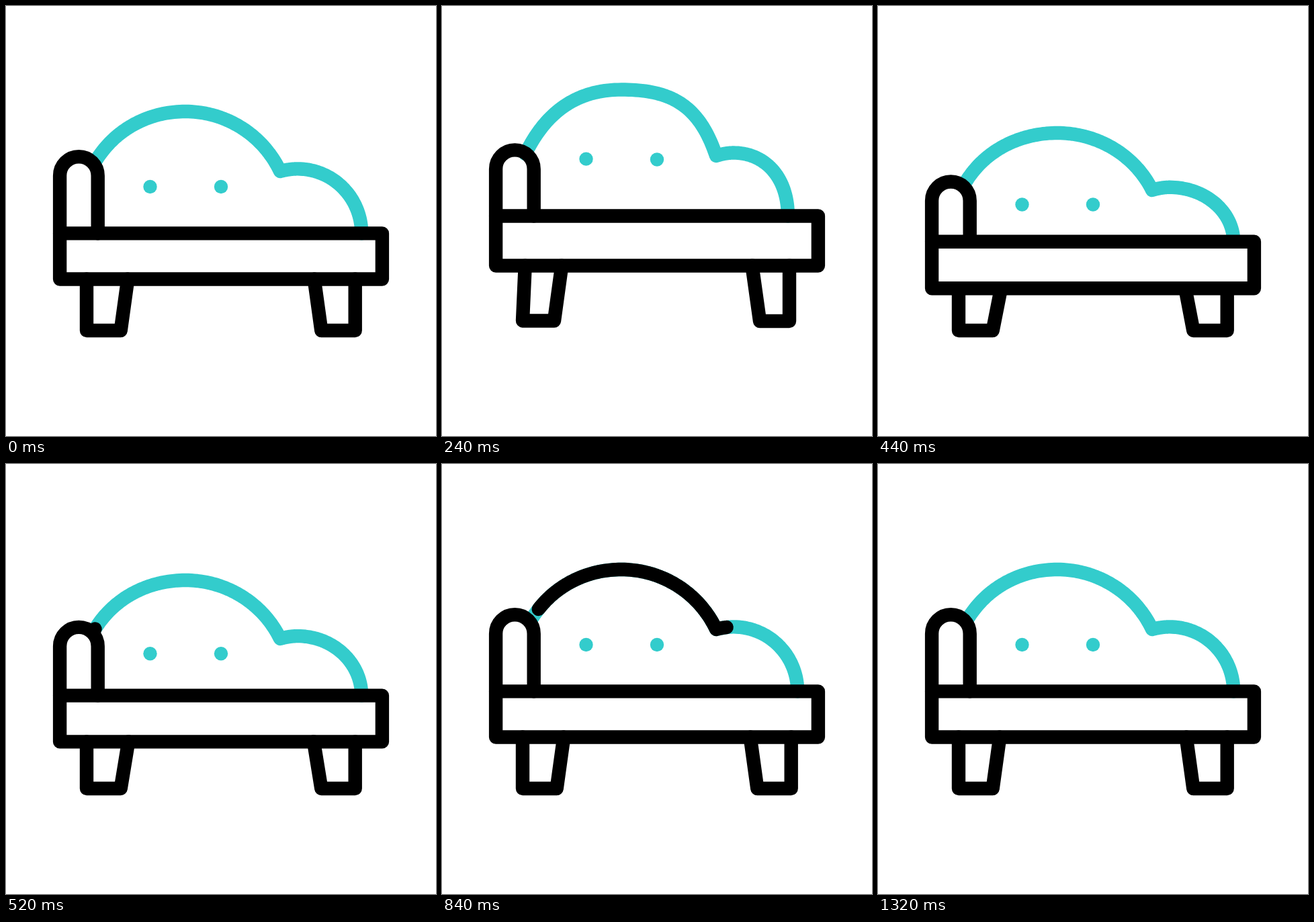
An HTML page with a canvas that plays this animation: 640x640 px, repeating every 1480 ms.

```html
<!DOCTYPE html>
<html lang="en">
<head>
<meta charset="utf-8">
<title>Chaise longue</title>
<style>
  html, body { margin: 0; width: 100%; height: 100%; overflow: hidden; background: #fff; }
  canvas { display: block; }
</style>
</head>
<body>
<canvas id="stage" width="640" height="640"></canvas>
<script>
const ctx = document.getElementById('stage').getContext('2d');
const LOOP = 1480, STEP = 40, BEAT = 160;
const TEAL = '#33cccc', BLACK = '#000';

const progress = (t, from, to) => Math.min(1, Math.max(0, (t - from) / (to - from)));
const smooth = x => x * x * (3 - 2 * x);
const pulse = (t, peak) => smooth(Math.max(0, 1 - Math.abs(t - peak) / BEAT));

// cubic-bezier(.65, 0, .35, 1), solved by bisection
function strongEase(x) {
  if (x <= 0 || x >= 1) return x;
  let lo = 0, hi = 1;
  for (let i = 0; i < 24; i++) {
    const s = (lo + hi) / 2, r = 1 - s;
    if (1.95 * r * r * s + 1.05 * r * s * s + s * s * s < x) lo = s; else hi = s;
  }
  return smooth(lo);
}

// curve from a foot up to a peak that it reaches horizontally; handles are shares of the span
function shoulder(foot, peak, lean, rise, reach) {
  const w = peak[0] - foot[0], h = peak[1] - foot[1];
  const handles = [[foot[0] + lean * w, foot[1] + rise * h], [peak[0] - reach * w, peak[1]]];
  const steps = 40;
  return Array.from({ length: steps + 1 }, (_, i) => {
    const s = i / steps, r = 1 - s;
    return [0, 1].map(k => r * r * r * foot[k] + 3 * r * r * s * handles[0][k] +
      3 * r * s * s * handles[1][k] + s * s * s * peak[k]);
  });
}

const pathLength = points => points.slice(1).reduce((sum, p, i) =>
  sum + Math.hypot(p[0] - points[i][0], p[1] - points[i][1]), 0);

function stroke(points, color, closed) {
  ctx.strokeStyle = color;
  ctx.beginPath();
  points.forEach(p => ctx.lineTo(...p));
  if (closed) ctx.closePath();
  ctx.stroke();
}

function strokePart(points, color, from, to) {
  if (to <= from) return;
  const length = pathLength(points);
  ctx.setLineDash([(to - from) * length, length]);
  ctx.lineDashOffset = -from * length;
  stroke(points, color);
  ctx.setLineDash([]);
}

function dot(x, y) {
  ctx.beginPath();
  ctx.arc(x, y, 10.2, 0, Math.PI * 2);
  ctx.fill();
}

function draw(t) {
  const lift = pulse(t, 280), sink = pulse(t, 440);
  const move = (rest, up, down = 0) => rest + up * lift + down * sink;

  ctx.fillStyle = '#fff';
  ctx.fillRect(0, 0, 640, 640);
  ctx.lineWidth = 20.4;
  ctx.lineCap = ctx.lineJoin = 'round';

  const top = move(338.4, -30.7, 12.4), bottom = move(406.5, -23.7, 13.8);

  const start = [move(131.7, -9), move(233.7, -16, 26.5)];
  const crown = [267, move(157, -38.5, 32)];
  const dip = [408, move(246, -27.3, 28)];
  const crest = [434, move(242.4, -28.3, 27.4)];
  const end = [move(529.2, -17), top];
  const back = [
    ...shoulder(start, crown, 0.207, 0.63, move(0.418, 0.075)),
    ...shoulder(dip, crown, 0.183, move(0.61, 0.2), move(0.428, 0.106)).reverse(),
    ...shoulder(dip, crest, 0.33, 0.61, 0.33),
    ...shoulder(end, crest, 0, move(0.553, 0.1), 0.553).reverse()
  ];
  stroke(back, TEAL);
  strokePart(back, BLACK,
    strongEase(progress(t, 720, 1320)), strongEase(progress(t, 480, 1110)));

  ctx.fillStyle = TEAL;
  dot(214.5, move(269, -49, 26.5));
  dot(320, move(269, -48, 26.5));

  const armY = move(252.5, -11.7, 37.3);
  ctx.strokeStyle = BLACK;
  ctx.beginPath();
  ctx.moveTo(80.1, top);
  ctx.arc(108.4, armY, 28.3, Math.PI, 0);
  ctx.lineTo(136.7, top);
  ctx.stroke();

  stroke([[80.1, top], [559.9, top], [559.9, bottom], [80.1, bottom]], BLACK, true);

  const leftFoot = move(483, -17.2), rightFoot = move(483, -16.6);
  stroke([[move(120, 4.4), bottom], [120, leftFoot],
    [move(170.7, -4.4), leftFoot], [move(181.3, -3.6, 1.8), bottom]], BLACK);
  stroke([[move(458.7, 3.3, -1.4), bottom], [move(469.3, 4.4), rightFoot],
    [move(519.7, -3.2), rightFoot], [move(519.7, -3.2), bottom]], BLACK);
}

function tick() {
  const t = performance.now() % LOOP;
  draw(Math.floor(t / STEP) * STEP);
  requestAnimationFrame(tick);
}
tick();
</script>
</body>
</html>
```
